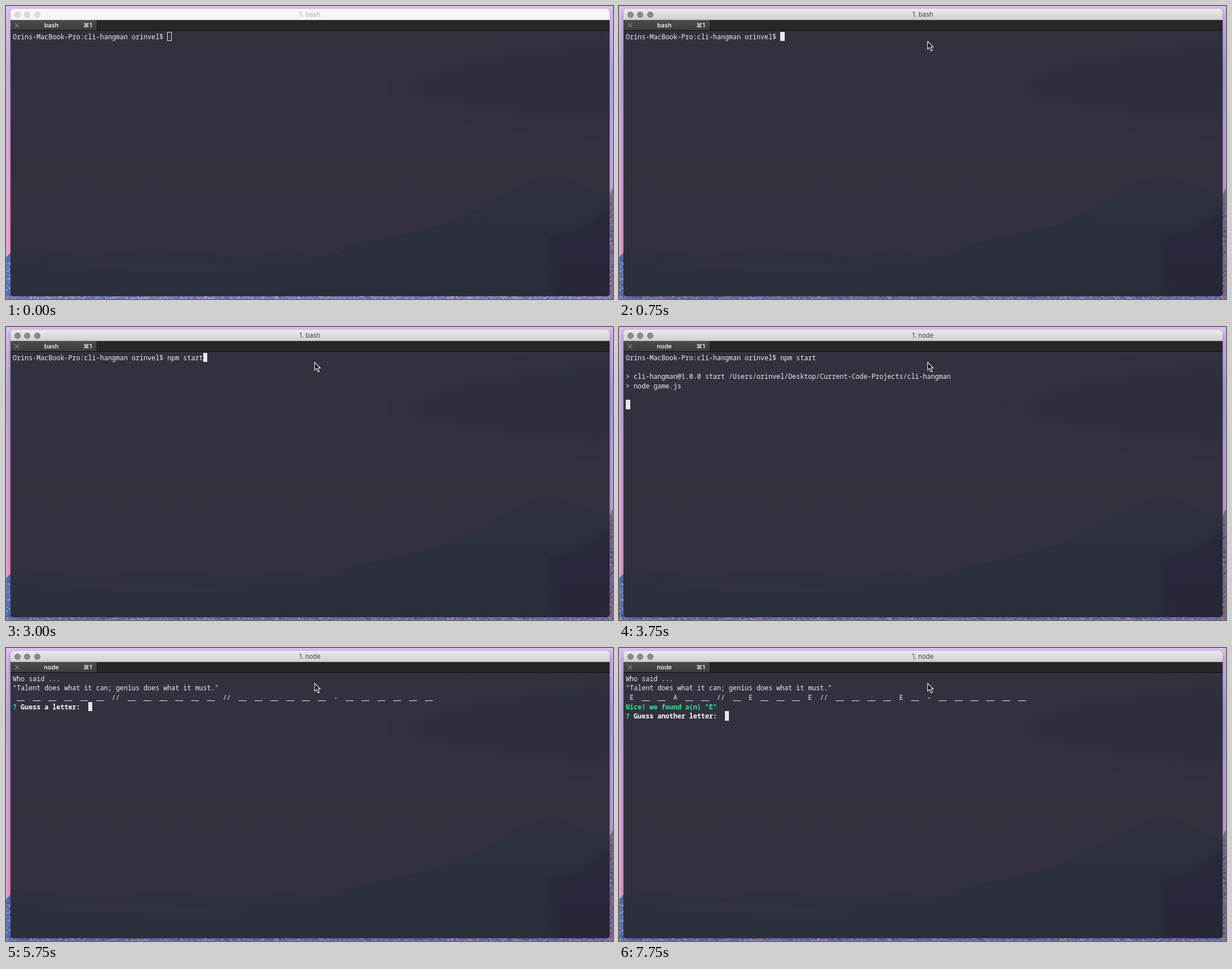
Animation, 1077 px wide and 520 px high, one loop 8 s. Source, as an HTML page with a canvas:

```html
<!DOCTYPE html>
<html lang="en">
<head>
<meta charset="utf-8">
<title>Terminal hangman</title>
<style>
  html, body { margin: 0; width: 100%; height: 100%; overflow: hidden; }
  body { position: relative; font: 11.3px Inter, "DejaVu Sans", sans-serif; }
  canvas, #window, #mouse, .bar, .bar *, #screen { position: absolute; }
  canvas { left: 0; top: 0; }
  #window { left: 8px; top: 5px; width: 1063px; height: 510px; border-radius: 5px 5px 2px 2px;
    overflow: hidden; }
  #frame { position: absolute; left: 8px; top: 5px; width: 1063px; height: 510px;
    border-radius: 5px 5px 2px 2px; box-shadow: 0 2px 6px rgba(30, 10, 60, .22); }
  .focused #frame { box-shadow: 0 4px 10px rgba(30, 10, 60, .42); }
  .bar { left: 0; width: 100%; }
  #titlebar { top: 0; height: 19px; border-bottom: 1px solid #d4d4d4; background: #f6f6f6;
    color: #b2b2b2; text-align: center; line-height: 20px; }
  .focused #titlebar { background: linear-gradient(#ebebeb, #d1d1d1); border-color: #aaa; color: #444; }
  #titlebar span { left: 0; width: 1062px; }
  #titlebar i { top: 4.5px; width: 9px; height: 9px; border: 1px solid #c9c9c9; border-radius: 50%;
    background: #dcdcdc; }
  .focused #titlebar i { background: #8b8b8b; border-color: #707070; }
  #tabs { top: 20px; height: 18px; background: #272727; border-bottom: 1px solid #0c0c0e;
    color: #fff; font-size: 11px; font-weight: 500; line-height: 19px; }
  #tab { left: 0; width: 153px; height: 18px; background: linear-gradient(#4b4b4b, #3d3d3d);
    border-right: 1px solid #161616; }
  #tab svg { left: 7px; top: 5px; }
  #tab .name { left: 0; width: 145px; text-align: center; }
  #tab .key { left: 129px; }
  #screen { left: 12px; top: 45.6px; margin: 0; color: #efeff1;
    font: 500 11.73px/16.7px "Noto Sans Mono", monospace; font-variant-ligatures: none; }
  #screen b { font-weight: 600; color: #fff; }
  #screen .green { color: #2fe993; }
  #screen .dim { color: #8d8c94; }
  #screen i { display: inline-block; box-sizing: border-box; width: 7.5px; height: 16.7px;
    vertical-align: top; border: 1px solid #e9e9ec; }
  .focused #screen i { background: #e9e9ec; }
</style>
</head>
<body>
<canvas id="backdrop" width="1077" height="520"></canvas>
<div id="frame"></div>
<div id="window">
  <div id="titlebar" class="bar">
    <i style="left:6.5px"></i><i style="left:24px"></i><i style="left:41.5px"></i>
    <span>1. <em class="process" style="position:static;font-style:normal"></em></span>
  </div>
  <div id="tabs" class="bar">
    <div id="tab">
      <svg width="9" height="9"><path d="M.7 .7l7.6 7.6M8.3 .7l-7.6 7.6" stroke="#8b8b8b" stroke-width="1.2"/></svg>
      <span class="name process"></span><span class="key">⌘1</span>
    </div>
  </div>
</div>
<pre id="screen"></pre>
<svg id="mouse" width="13" height="20" style="overflow:visible">
  <path d="M.7 .8V14.6L3.9 11.6L6.5 17.6L8.9 16.6L6.4 10.8H10.6Z" fill="#111" stroke="#fff" stroke-width="1.1"/>
</svg>
<template id="banner"> __        __   _                          _
 \ \      / /__| | ___ ___  _ __ ___   ___| |
  \ \ /\ / / _ \ |/ __/ _ \| '_ ` _ \ / _ \ |
   \ V  V /  __/ | (_| (_) | | | | | |  __/_|
    \_/\_/ \___|_|\___\___/|_| |_| |_|\___(_)</template>
<script>
const $ = id => document.getElementById(id);
const LOOP = 8000;

function paintBackdrop() {
  const c = $('backdrop').getContext('2d');
  const fade = (x0, y0, x1, y1, ...colors) => {
    const g = c.createLinearGradient(x0, y0, x1, y1);
    colors.forEach((color, i) => g.addColorStop(i / (colors.length - 1), color));
    return g;
  };
  const rect = (fill, x, y, w, h) => { c.fillStyle = fill; c.fillRect(x, y, w, h); };
  const shape = (fill, path) => { c.fillStyle = fill; c.fill(new Path2D(path)); };
  let seed = 7;
  const random = () => (seed = seed * 16807 % 2147483647) / 2147483647;
  const speckle = (n, x, y, w, h, colors) => {
    for (let i = 0; i < n; i++)
      rect(colors[i % colors.length], x + random() * w, y + random() * h, 1 + random() * 3, 1 + random() * 2);
  };

  // desktop around the window
  rect(fade(0, 0, 0, 440, '#e2c2f1', '#c4b1dc', '#d8aee0', '#e8a8d8', '#eba5cf'), 0, 0, 540, 520);
  rect(fade(0, 0, 0, 340, '#dfbff2', '#b3a4ea', '#c3a8ee', '#c6a9dc'), 540, 0, 537, 520);
  rect('#e1bff1', 0, 0, 1077, 6);
  shape('#5876b4', 'M0 446L8 438V520H0Z');
  rect('#8587c4', 0, 514, 1077, 6);
  shape('#8a7394', 'M1068 340L1077 322V520H1068Z');
  speckle(90, 0, 446, 8, 74, ['#3f5f9f', '#9aa5d8', '#4d79bd', '#b39ccb']);
  speckle(700, 0, 514, 1077, 6, ['#4f6db0', '#b9a6dc', '#6a76b8', '#d0b4e0']);
  speckle(110, 1070, 338, 7, 180, ['#65557a', '#b498b4', '#77628c', '#54486f']);

  // translucent terminal with the landscape showing through
  c.save();
  c.beginPath();
  c.roundRect(8, 5, 1063, 510, 5);
  c.clip();
  rect(fade(0, 43, 0, 515, '#32323f', '#323140', '#34313f', '#353140', '#30303d'), 8, 5, 1063, 510);
  c.filter = 'blur(14px)';
  shape('rgba(43,46,60,.55)', 'M700 150Q780 95 920 85L1090 60V205Q880 195 700 150Z');
  c.filter = 'blur(1.5px)';
  shape(fade(0, 430, 0, 515, '#2e303d', '#2b2e3b'),
    'M0 430L70 437L150 447L260 436L340 440L430 447L500 434L535 446L580 444V520H0Z');
  shape(fade(0, 300, 0, 515, '#2e303e', '#2c2f3d', '#2a2d3a'),
    'M500 475L570 448L620 424L690 409L780 387L850 356L915 317L968 299L1000 312L1040 330L1080 343V520H480Z');
  c.filter = 'blur(4px)';
  shape('rgba(53,55,66,.5)', 'M45 465Q130 445 250 452T480 470Q350 480 200 472T45 465Z');
  shape('rgba(38,39,57,.75)', 'M962 408L1015 400L1080 350V520H968Z');
  c.restore();
}

const prompt = 'Orins-MacBook-Pro:cli-hangman orinvel$ ';
const command = prompt + 'npm start\n';
const ask = text => `<b><span class="green">?</span> ${text}</b>`;
const welcome = `<b>${$('banner').innerHTML}</b>\n\n${ask('Want to play hangman?')} <span class="dim">(Y/n)</span> `;

// Lower-case x stands for a letter still hidden.
const quiz = (answer, rest) => 'Who said ...\n"Talent does what it can; genius does what it must."\n ' +
  answer.split(' ').map(word => word.replace(/x/g, '__ ').replace(/[A-Z]/g, '$& ').trim().split(' ').join('  '))
    .join('  ') + '\n' + rest;
const found = letter => `<b class="green">Nice! we found a(n) "${letter}"</b>\n${ask('Guess another letter:')}  `;
const firstGuess = quiz('xxxxxx // xxxxxx // xxxxxx - xxxxxx', ask('Guess a letter:') + '  ');

const steps = [
  [0, prompt],
  [1750, prompt + 'n'],
  [2000, prompt + 'np'],
  [2250, prompt + 'npm '],
  [2500, prompt + 'npm st'],
  [2750, prompt + 'npm star'],
  [3000, prompt + 'npm start'],
  [3250, command],
  [3750, command + '\n> cli-hangman@1.0.0 start /Users/orinvel/Desktop/Current-Code-Projects/cli-hangman\n> node game.js\n\n'],
  [4500, welcome],
  [5250, welcome + 'y'],
  [5500, ''],
  [5750, firstGuess],
  [7000, firstGuess + 'a'],
  [7250, quiz('xxxAxx // xxxxxx // xxxxxx - xxxxxx', found('A'))],
  [7750, quiz('ExxAxx // xExxxE // xxxxEx - xxxxxx', found('E'))]
];

let shown;
function draw() {
  const t = performance.now() % LOOP;
  const step = steps.findLast(([start]) => t >= start);
  if (step !== shown) {
    shown = step;
    $('screen').innerHTML = step[1] + '<i></i>';
    for (const el of document.querySelectorAll('.process')) el.textContent = t < 3750 ? 'bash' : 'node';
  }
  document.body.className = t < 750 ? '' : 'focused';
  const mouse = $('mouse').style;
  mouse.visibility = t < 250 ? 'hidden' : 'visible';
  [mouse.left, mouse.top] = t < 500 ? ['621px', '80px'] : ['547px', '62px'];
  requestAnimationFrame(draw);
}

paintBackdrop();
draw();
</script>
</body>
</html>
```
